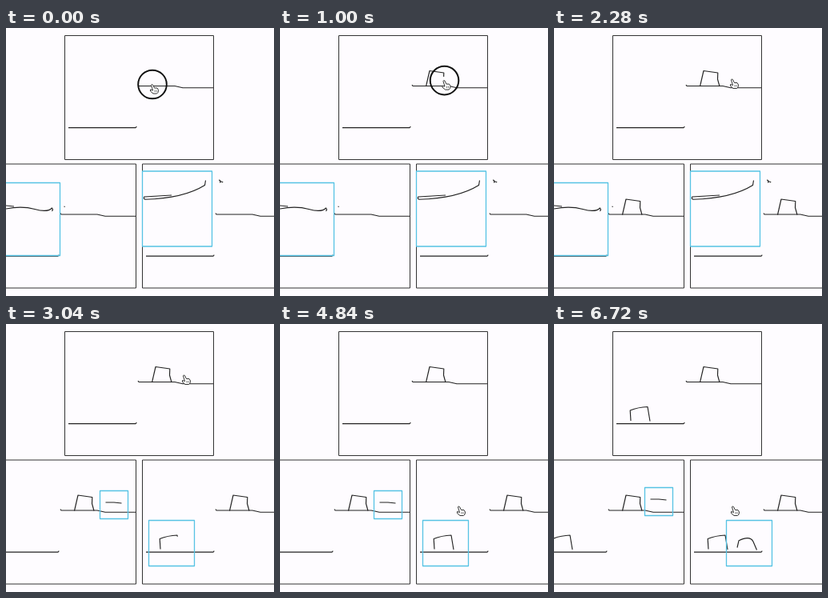
Write an HTML page that moves like this. It is 335x335 px and loops after 7.04 s.

```html
<!DOCTYPE html>
<html lang="en">
<head>
<meta charset="utf-8">
<title>Shared sketch</title>
<style>
html, body { margin: 0; width: 100%; height: 100%; overflow: hidden; background: #fefcff; }
svg { display: block; width: 100%; height: 100%; fill: none; stroke: #222; stroke-width: 1.15; stroke-linejoin: round; }
.frame { stroke: #333; stroke-width: 1; }
.box { stroke: #56c3e4; stroke-width: 1.3; }
.grow { stroke-dasharray: 1 2; }
</style>
</head>
<body>
<svg viewBox="0 0 335 335">
  <g class="panel">
    <rect class="frame" x="73.5" y="9.5" width="186" height="155"/>
    <path d="M165 71l1 1.5L211 72.5 221 74.7H259M78 124.6H162l1.3-1.4"/>
    <path class="block grow" pathLength="1" d="M182.5 73L187 53.5 204.8 56 204.5 64 207 73"/>
    <path class="arch grow" pathLength="1" d="M96 121L95.2 108Q105 104 117 103.5L120 121.5"/>
  </g>
  <g id="first">
    <path d="M0 226Q20 222 36 226.5T57.5 225l1 2-1 2M0 222l10 1M72.5 223l1.2.5"/>
    <path d="M207 209L173 211q-2 2 1 3.3Q222 213 248.5 196.5l1-6M266 190l1.7.5v2.5q1-2 3.5 0"/>
    <rect class="box" x="-25" y="193.5" width="92.5" height="91"/>
    <rect class="box" x="170.5" y="179" width="87" height="94"/>
  </g>
  <g id="lid">
    <rect class="box" x="117.5" y="208.5" width="35" height="35"/>
    <path class="grow" pathLength="1" d="M124.5 223H135l9.5 1"/>
  </g>
  <rect id="archBox" class="box" x="178.5" y="245.5" width="57" height="57"/>
  <g id="next">
    <rect class="box" x="215.5" y="245.5" width="57" height="57"/>
    <path class="grow" pathLength="1" d="M229 279.5L231 270.8Q245 264 249 272L253.5 282.5"/>
  </g>
  <g id="cursor">
    <circle r="17.8" stroke="#111" stroke-width="2"/>
    <path fill="#fff" stroke="#333" stroke-width="1" d="M-1.5 1Q-1-1 .5 .5L2.5 4.5 6 4.5 7.5 7 7 10 5.5 11.5H1L-2.5 8.5V6.5L.5 7.5Z"/>
    <path stroke-width=".6" d="M3 7v2.5M5 7v2.5"/>
  </g>
</svg>
<script>
const LOOP = 7040, STEP = 40;
const $ = s => document.querySelector(s);
const ramp = (t, a, b) => Math.min(1, Math.max(0, (t - a) / (b - a)));
const show = (el, on) => el.style.display = on ? '' : 'none';
const grow = (el, share) => el.style.strokeDashoffset = 1 - share;

// Time, x, y of each place the pointer heads for
const stops = [
  [0, 183, 70.5], [280, 187, 54], [680, 202, 55], [1480, 208, 73],
  [2000, 223, 64], [3640, 223, 64], [4080, 226, 80], [4640, 224, 228]
];

const panel = $('.panel');
const panels = [[0, 0], [-97, 160.5], [97, 160.5]].map(([x, y], i) => {
  const p = i ? panel.cloneNode(true) : panel;
  p.setAttribute('transform', `translate(${x} ${y})`);
  if (i) panel.after(p);
  return p;
});

function pointerAt(t) {
  const i = stops.findIndex(s => s[0] > t);
  if (i < 0) return stops.at(-1).slice(1);
  const [t0, x0, y0] = stops[i - 1], [t1, x1, y1] = stops[i];
  const u = Math.sin(ramp(t, t0, t1) * Math.PI / 2);
  return [x0 + (x1 - x0) * u, y0 + (y1 - y0) * u];
}

function draw(t) {
  const sent = +(t >= 1520), accepted = +(t >= 5080), second = t >= 5560;
  const blocks = [ramp(t, 0, 1440) ** .7, sent, sent];
  const arches = [accepted, accepted, ramp(t, 2320, 3360)];
  panels.forEach((p, i) => {
    grow(p.querySelector('.block'), blocks[i]);
    grow(p.querySelector('.arch'), arches[i]);
  });

  show($('#first'), t < 2320);
  show($('#lid'), t >= 2320);
  show($('#archBox'), t >= 2320 && t < 5240);
  show($('#next'), second);
  $('#lid').setAttribute('transform', second ? 'translate(-4 -4)' : '');
  grow($('#lid path'), second ? ramp(t, 5560, 6240) : ramp(t, 2320, 2880));
  grow($('#next path'), ramp(t, 5560, 6440));

  $('#cursor').setAttribute('transform', `translate(${pointerAt(t)})`);
  show($('#cursor circle'), t < 1480 || (t >= 4800 && t < 4840));
}

let start;
function tick(now) {
  start ??= now;
  draw(Math.floor((now - start) % LOOP / STEP) * STEP);
  requestAnimationFrame(tick);
}
requestAnimationFrame(tick);
</script>
</body>
</html>
```
